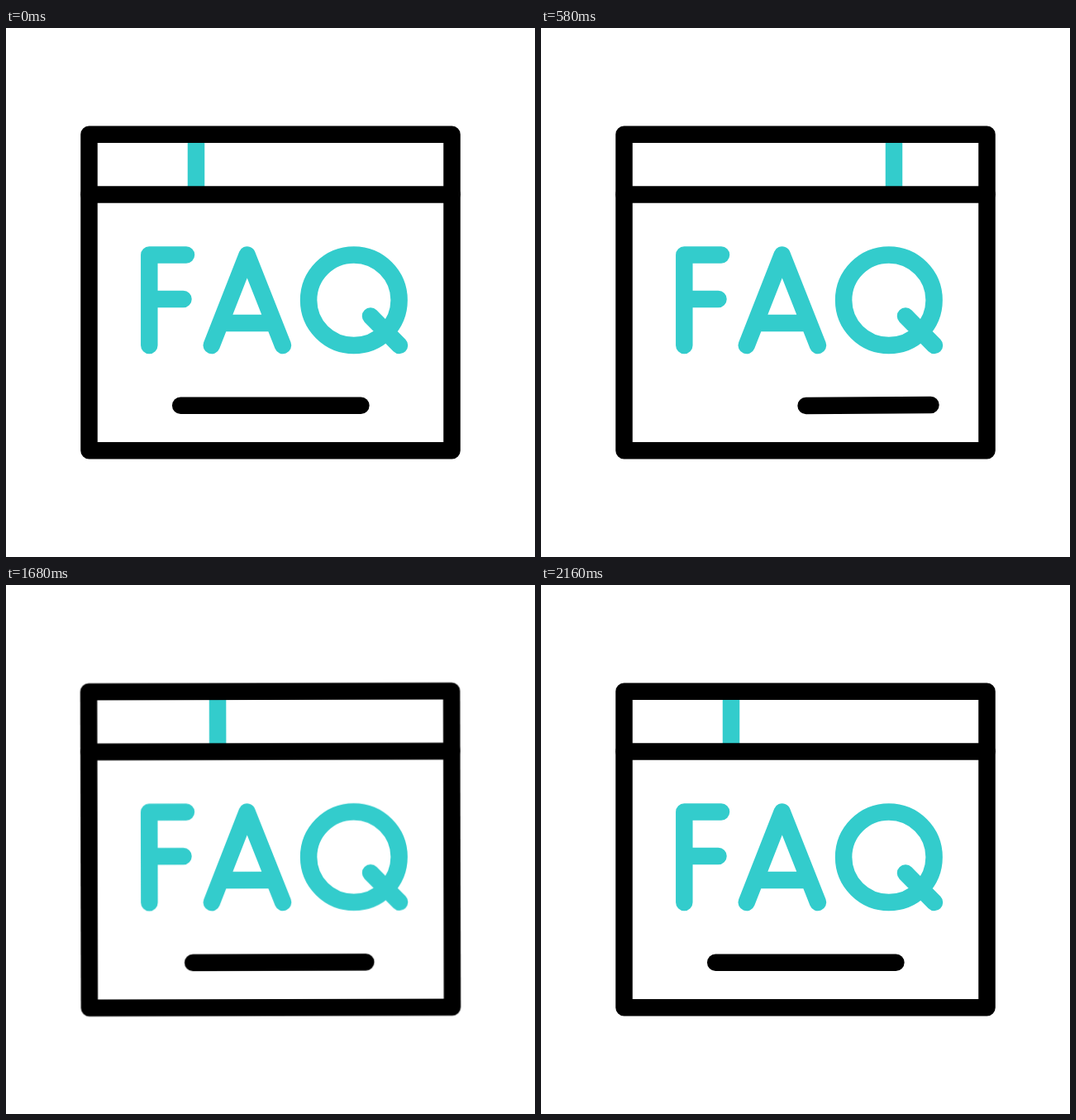
Recreate the animation shown at these times as an HTML page without scripts. Size 640 by 640 pixels, loop 2420 ms.

```html
<!DOCTYPE html>
<html lang="en">
<head>
<meta charset="utf-8">
<title>FAQ window</title>
<style>
  html, body { margin: 0; width: 100%; height: 100%; overflow: hidden; background: #fff; }
  svg { display: block; width: 100vw; height: 100vh; }

  :root {
    --loop: 2420ms;
    --smooth: cubic-bezier(.333, 0, .667, 1);
    --glide: cubic-bezier(.32, 0, .01, 1);
  }

  path, rect { fill: none; stroke: #000; stroke-width: 20.5; stroke-linecap: round; stroke-linejoin: round; }
  .teal { stroke: #33cccc; }

  .window { transform-origin: 320px 320px; animation: wobble var(--loop) var(--smooth) infinite; }
  .tab { stroke-linecap: butt; animation: slide var(--loop) var(--glide) infinite; }
  .rule { animation: squeeze var(--loop) var(--glide) infinite; }

  /* a black stroke that fills each letter, then drains from its start */
  .ink path {
    stroke-width: 22.6;
    stroke-dasharray: 100 200;
    stroke-dashoffset: 100;
    opacity: 0;
    animation: ink var(--loop) var(--smooth) var(--wait) infinite;
  }

  @keyframes wobble {
    0%, 20.66%, 68.6%, 89.26%, 100% { transform: rotate(0deg); }
    6.9%, 75.5% { transform: rotate(-3deg); }
    13.76%, 82.36% { transform: rotate(3deg); }
  }
  @keyframes slide {
    0%, 89.26%, 100% { transform: translateX(0); }
    47.52% { transform: translateX(226.5px); }
  }
  @keyframes squeeze {
    0%, 89.26%, 100% { d: path("M211.2 456.7L429.4 456.7"); }
    47.52% { d: path("M337 457L477.8 455.9"); }
  }
  @keyframes ink {
    0% { stroke-dashoffset: 100; opacity: 1; }
    17.98% { stroke-dashoffset: 0; opacity: 1; }
    35.95% { stroke-dashoffset: -100; opacity: 1; }
    35.96%, 100% { stroke-dashoffset: -100; opacity: 0; }
  }
</style>
</head>
<body>
<svg viewBox="0 0 640 640" role="img" aria-label="FAQ">
  <defs>
    <path id="stem" pathLength="100" d="M218 274.5H173.3V384"/>
  </defs>
  <g class="window">
    <path class="teal tab" d="M230 129V201"/>
    <rect x="100.5" y="128.8" width="439" height="382.4"/>
    <path d="M100.5 201.4H539.5"/>
    <path class="rule" d="M211.2 456.7L429.4 456.7"/>

    <g>
      <path class="teal" d="M218 274.5H173.3V384M173.3 328H214.5"/>
      <path class="teal" d="M248.7 384L291.7 274.5L335 384M266 357H318"/>
      <path class="teal" d="M475.6 329.3a54.75 54.75 0 1 1-109.5 0a54.75 54.75 0 1 1 109.5 0M441 348.5L476 384"/>
    </g>

    <g class="ink">
      <path style="--wait:595ms" pathLength="100" d="M218 274.5H173.3V384"/>
      <path style="--wait:610ms" pathLength="100" d="M173.3 328H214.5"/>
      <path style="--wait:660ms" pathLength="100" d="M248.7 384L291.7 274.5L335 384"/>
      <path style="--wait:700ms" pathLength="100" d="M266 357H318"/>
      <path style="--wait:729ms" pathLength="100" d="M475.6 329.3a54.75 54.75 0 1 1-109.5 0a54.75 54.75 0 1 1 109.5 0"/>
      <path style="--wait:724ms" pathLength="100" d="M441 348.5L476 384"/>
    </g>
  </g>
</svg>
</body>
</html>
```
